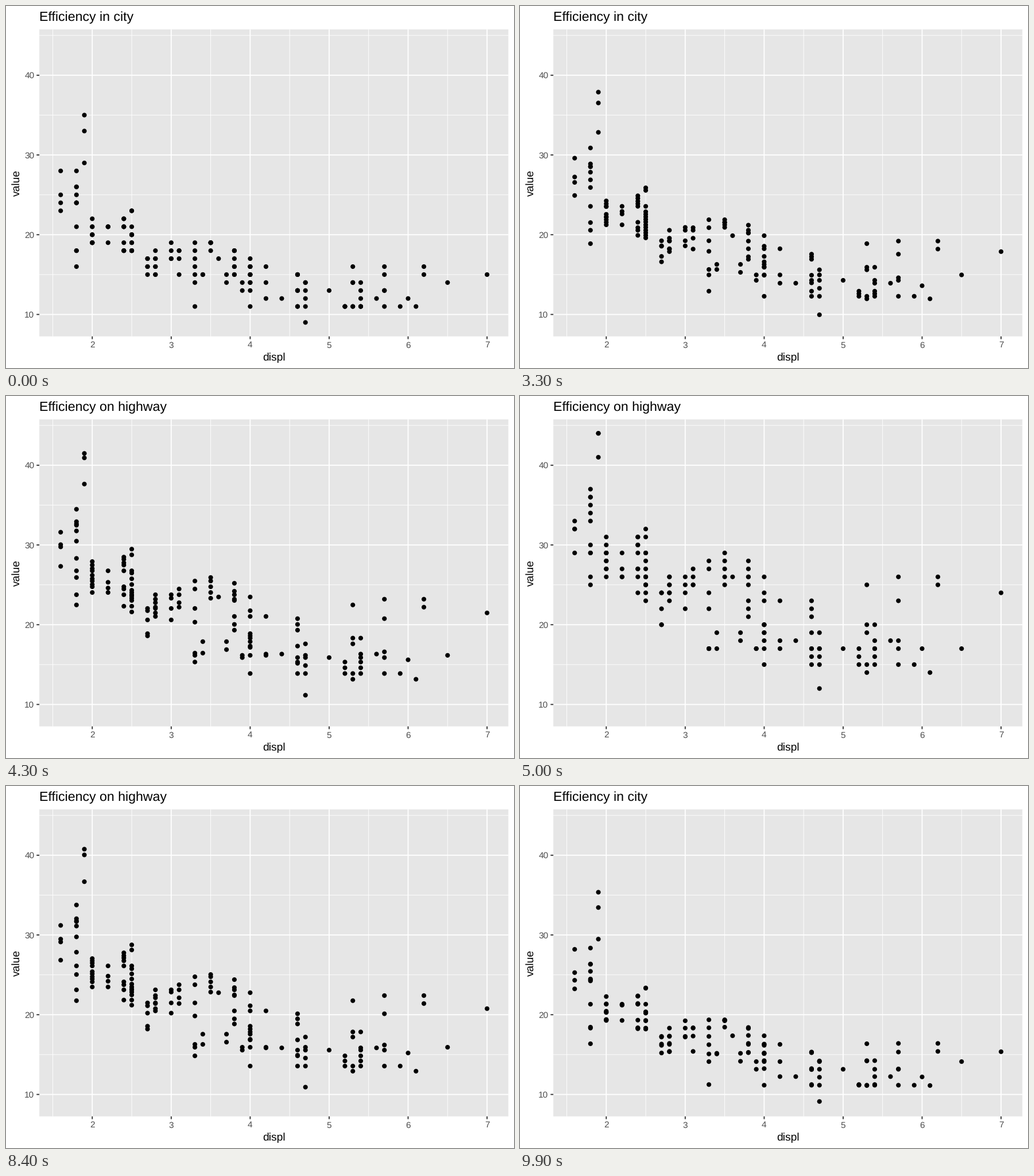
A matplotlib script for the animation above (10000 ms loop, 885 by 632 pixels).

```python
import numpy as np
import matplotlib.pyplot as plt
from matplotlib.animation import FuncAnimation
from matplotlib.patches import Rectangle

W, H, DPI = 885, 632, 100
FRAMES, STEP = 100, 100
LEFT, RIGHT, TOP, BOTTOM = 58.1, 875.2, 40.8, 576.8
TICK = 4.83

plt.rcParams["font.family"] = "Liberation Sans"
plt.rcParams["text.hinting"] = "none"


def pt(px):
    return px * 72 / DPI


def sx(v):
    return LEFT + (np.asarray(v) - 1.33) / 5.94 * (RIGHT - LEFT)


def sy(v):
    return BOTTOM - (np.asarray(v) - 7.25) / 38.5 * (BOTTOM - TOP)


cars = []


def engine(displ, *groups):
    """Each group is a city value followed by its highway values."""
    for city, *highway in groups:
        cars.extend((displ, city, h) for h in highway)


engine(1.6, (23, 29), (24, 32), (25, 32), (28, 33))
engine(1.8, (16, 25), (18, 26, 29), (21, 29), (24, 30, 33, 36),
       (25, 36), (26, 34, 35), (28, 37))
engine(1.9, (29, 41), (33, 44), (35, 44))
engine(2.0, (19, *range(26, 30)), (20, 27, 28, 31), (21, 29, 30), (22, 29))
engine(2.2, (19, 26), (21, 26, 27, 29))
engine(2.4, (18, 24, 26, 27), (19, 27), (21, 29, 30, 31), (22, 30, 31))
engine(2.5, (18, *range(23, 27)), (19, 25, 26), (20, *range(25, 30)),
       (21, 29), (23, 31, 32))
engine(2.7, (15, 20), (16, 20, 24), (17, 22, 24))
engine(2.8, (15, 24, 25), (16, 23, 26), (17, 24, 25), (18, 26))
engine(3.0, (17, 22, 24), (18, 26), (19, 25))
engine(3.1, (15, 25), (17, 25), (18, 26, 27))
engine(3.3, (11, 17), (14, 17), (15, 17), (16, 22), (17, 24),
       (18, 27), (19, 28))
engine(3.4, (15, 17, 19))
engine(3.5, (18, 29), (19, *range(25, 29)))
engine(3.6, (17, 26))
engine(3.7, (14, 18), (15, 19))
engine(3.8, (15, 21, 22), (16, 23, 26), (17, 27), (18, 25, 26, 28))
engine(3.9, (13, 17), (14, 17))
engine(4.0, (11, 15), (13, 19), (14, 17, 20), (15, 18, 19, 20),
       (16, 20, 23, 24), (17, 26))
engine(4.2, (12, 18), (14, 17), (16, 23))
engine(4.4, (12, 18))
engine(4.6, (11, 15, 17), (13, 16, 17, 19), (15, 21, 22, 23))
engine(4.7, (9, 12), (11, 15), (12, 16), (13, 17), (14, 17, 19))
engine(5.0, (13, 17))
engine(5.2, (11, 15, 16, 17))
engine(5.3, (11, 14, 15), (14, 19, 20), (16, 25))
engine(5.4, (11, 15, 16, 17), (12, 18), (13, 17), (14, 20))
engine(5.6, (12, 18))
engine(5.7, (11, 15), (13, 17, 18), (15, 23), (16, 26))
engine(5.9, (11, 15))
engine(6.0, (12, 17))
engine(6.1, (11, 14))
engine(6.2, (15, 25), (16, 26))
engine(6.5, (14, 17))
engine(7.0, (15, 24))
displ, city, highway = np.array(cars, float).T

fig = plt.figure(figsize=(W / DPI, H / DPI), dpi=DPI, facecolor="white")
ax = fig.add_axes([0, 0, 1, 1])
ax.set_xlim(0, W)
ax.set_ylim(H, 0)
ax.axis("off")


def line(x0, y0, x1, y1, width, color):
    ax.plot([x0, x1], [y0, y1], color=color, lw=pt(width), snap=False,
            solid_capstyle="butt", zorder=2)


def label(x, y, text, size, color="black", **kw):
    kw = {"ha": "center", "va": "baseline", **kw}
    return ax.text(x, y, text, fontsize=pt(size), color=color, **kw)


ax.add_patch(Rectangle((LEFT, TOP), RIGHT - LEFT, BOTTOM - TOP,
                       fc="#E6E6E6", ec="none", snap=False, zorder=1))

for v in np.arange(1.5, 7):
    line(sx(v), TOP, sx(v), BOTTOM, 0.94, "white")
for v in range(15, 46, 10):
    line(LEFT, sy(v), RIGHT, sy(v), 0.94, "white")
for v in range(2, 8):
    x = sx(v)
    line(x, TOP, x, BOTTOM, 1.87, "white")
    line(x, BOTTOM, x, BOTTOM + TICK, 1.87, "#333333")
    label(x, 596.5, str(v), 15.45, "#4D4D4D")
for v in range(10, 41, 10):
    y = sy(v)
    line(LEFT, y, RIGHT, y, 1.87, "white")
    line(LEFT - TICK, y, LEFT, y, 1.87, "#333333")
    label(49.4, y + 5.5, str(v), 15.45, "#4D4D4D", ha="right")

mid_x, mid_y = (LEFT + RIGHT) / 2, (TOP + BOTTOM) / 2
label(mid_x, 618.6, "displ", 19.31)
label(23.7, mid_y, "value", 19.31, rotation=90, rotation_mode="anchor")
title = label(LEFT, 26.4, "", 23.18, ha="left")

dots = ax.scatter(sx(displ), sy(city), s=pt(8.1) ** 2, c="black",
                  edgecolors="none", zorder=3)
dots.set_snap(False)


def update(i):
    # hold on city, glide to highway, hold, glide back
    t = np.interp(i, [0, 25, 50, 75, 100], [0, 0, 1, 1, 0])
    value = city + (highway - city) * t
    dots.set_offsets(np.column_stack([sx(displ), sy(value)]))
    title.set_text("Efficiency " + ("on highway" if t > 0.5 else "in city"))
    return dots, title


anim = FuncAnimation(fig, update, frames=FRAMES, interval=STEP,
                     init_func=lambda: update(0), repeat=True, repeat_delay=0)
plt.show()
```
